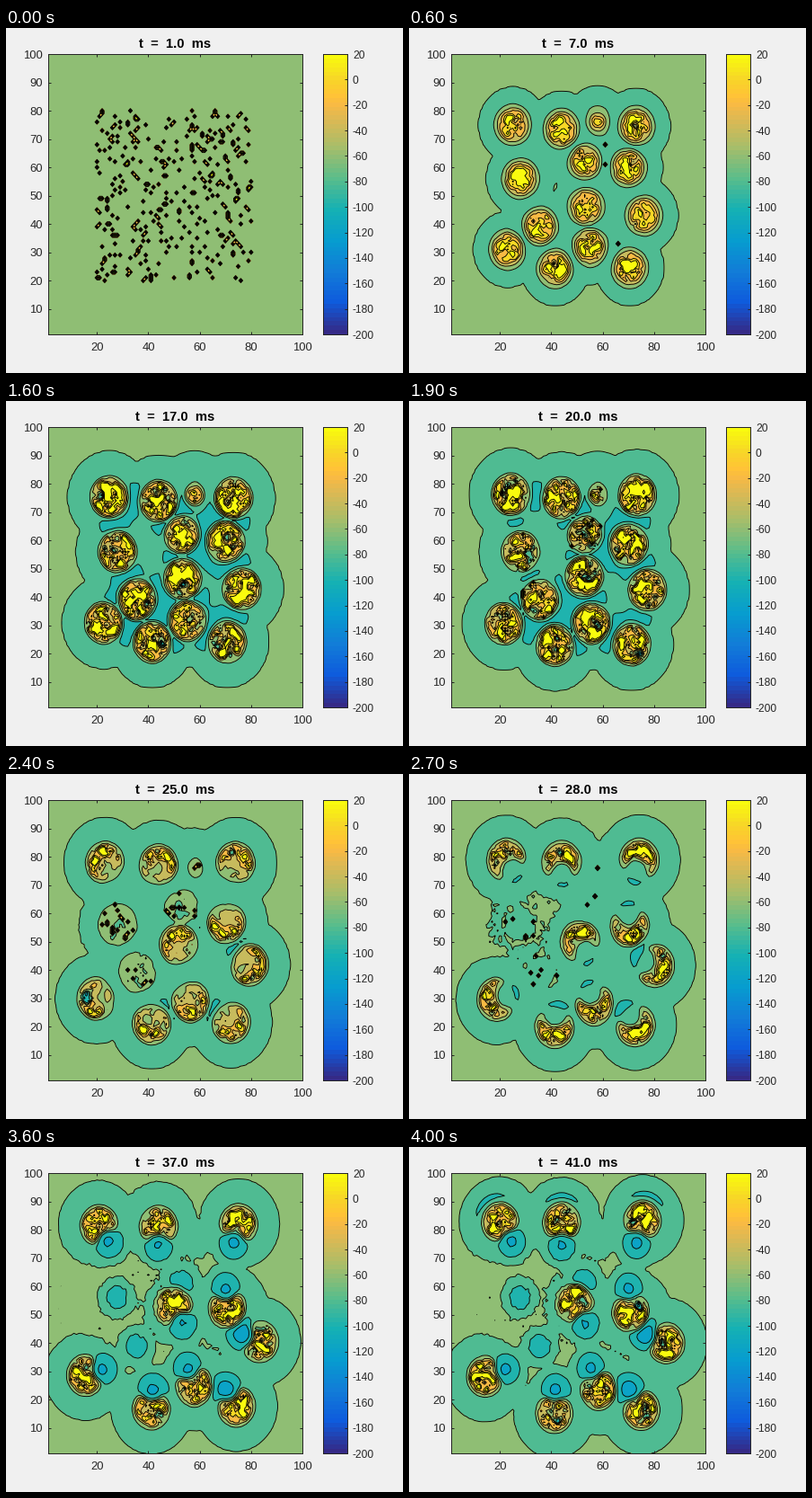
A matplotlib script for the animation above (4100 ms loop, 442 by 384 pixels).

```python
import numpy as np
import matplotlib.pyplot as plt
from matplotlib.animation import FuncAnimation
from matplotlib.colors import LinearSegmentedColormap, Normalize

W, H, DPI = 442, 384, 100
PX = 72 / DPI
FRAMES, STEP = 41, 100
INK = "#262626"
RADIUS = 6.8
TRAVEL = 9.2

plt.rcParams["font.family"] = "Liberation Sans"
plt.rcParams["axes.unicode_minus"] = False

STOPS = [(0, "#352a87"), (7, "#0f5cdd"), (14, "#127dd8"), (21, "#079dcf"),
         (28, "#15b1b4"), (35, "#59bd8c"), (42, "#a5be6b"), (49, "#e1b952"),
         (52, "#f8ba44"), (54, "#ffc337"), (58, "#f7d826"), (63, "#f9fb0e")]
CMAP = LinearSegmentedColormap.from_list(
    "volt", [(i / 63, c) for i, c in STOPS], N=64)
LEVELS = np.arange(-200, 21, 20)
FILLS = CMAP(Normalize(-200, 20)(LEVELS))

# x, y, heading in degrees
MOVERS = [(25, 75, 123), (44, 73.5, 90), (73, 74.5, 74), (70, 60, 276),
          (53.5, 46, 118), (76, 43, 341), (23, 31, 198), (41.5, 24.5, 268),
          (55, 32, 292), (70.5, 24.5, 299)]
# x, y, radius
FADERS = [(28, 56, 6.8), (35.5, 39, 6.8), (53, 62, 6.2), (58, 76, 3)]

axis = np.arange(1, 101)
X, Y = np.meshgrid(axis, axis)


def ramp(t, a, b):
    return float(np.clip((t - a) / (b - a), 0, 1))


def disc(d, r, edge):
    """Soft-edged disc, 1 inside and 0 outside."""
    return 1 / (1 + np.exp((d - r) / edge))


def smooth(n):
    """3x3 sum scaled back to unit variance."""
    rows = n + np.roll(n, 1, 0) + np.roll(n, -1, 0)
    return (rows + np.roll(rows, 1, 1) + np.roll(rows, -1, 1)) / 3


def cells(t):
    """Home, unit heading, radius, shift and strength of every bump."""
    shift = TRAVEL * ramp(t, 16, 41)
    for x, y, deg in MOVERS:
        a = np.radians(deg)
        yield x, y, np.cos(a), np.sin(a), RADIUS, shift, 1
    for x, y, r in FADERS:
        yield x, y, 0, 0, r, 0, 1 - ramp(t, 17, 30)


def field(t):
    """Membrane voltage of the sheet at t ms."""
    rng = np.random.default_rng(40 + t)
    raw = rng.standard_normal(X.shape)
    chance = rng.random(X.shape)

    size = 0.6 + 0.4 * ramp(t, 1, 12) - 0.1 * ramp(t, 20, 41)
    edge = 1.0 - 0.35 * ramp(t, 7, 13)
    pull = 34 * ramp(t, 1, 9) - 17 * ramp(t, 20, 28)
    reach = 11 + 5.6 * ramp(t, 1, 13)
    cut = ramp(t, 21, 30)
    tired = 28 * ramp(t, 21, 33)
    rise = ramp(t, 1, 6)

    active, core, dying, low = (np.zeros(X.shape) for _ in range(4))
    for x, y, ux, uy, r, shift, alive in cells(t):
        dx, dy = X - x - ux * shift, Y - y - uy * shift
        d = np.hypot(dx, dy) + 1e-6
        home = np.hypot(X - x, Y - y)
        share = (r / RADIUS) ** 2

        body = disc(d, r * size, edge) * (1 - cut * disc(home, 5.2, 0.6))
        active = np.maximum(active, body * alive * rise)
        core = np.maximum(core, body)
        dying = np.maximum(dying, disc(d, r, 0.4) * (alive < 1))

        # pull on the surroundings, then the tired patch left behind
        low += pull * alive * share * np.clip(1 - (d / reach) ** 2, 0, 1) ** 2
        low += tired * share * np.exp(-(home / 6) ** 4)
        low += alive * 8 * ramp(t, 33, 41) * np.exp(-(home / 2.5) ** 2)
        if y > 70:
            ahead = np.clip((dx * ux + dy * uy) / d, 0, 1)
            low += 18 * ramp(t, 34, 41) * ahead * np.exp(
                -((d - 9.5) / 1.8) ** 2)

    loose = ramp(t, 22, 34) * np.exp(
        -((X - 42) ** 2 + (Y - 55) ** 2) / 22 ** 2)
    rest = -59.9 + loose * (4 + 1.8 * raw) - low

    mean = 18 - 12 * ramp(t, 7, 20)
    jitter = 26 + 10 * ramp(t, 7, 13)
    noise = 0.7 * smooth(raw) + 0.7 * raw
    v = rest * (1 - active) + active * (mean + jitter * core ** 2 * noise)

    square = (np.abs(X - 50) <= 30) & (np.abs(Y - 50) <= 30)
    odds = 0.092 * np.exp(-(t - 1) / 1.5) * square
    odds = odds + 0.07 * dying * (1 - ramp(t, 25, 30))
    v[chance < odds] = 30
    return np.clip(v, -199, 36)


def frame_axes(x, y, w, h):
    ax = fig.add_axes([x / W, 1 - (y + h) / H, w / W, h / H])
    for side in ax.spines.values():
        side.set(color=INK, linewidth=PX, zorder=5)
    return ax


fig = plt.figure(figsize=(W / DPI, H / DPI), dpi=DPI, facecolor="#f0f0f0")

ax = frame_axes(47, 29, 283, 312)
ax.set(xlim=(1, 100), ylim=(1, 100),
       xticks=range(20, 101, 20), yticks=range(10, 101, 10))
ax.set_autoscale_on(False)
ax.set_axisbelow(False)
ax.tick_params(direction="in", top=True, right=True, length=3 * PX,
               width=PX, color=INK, labelcolor=INK, labelsize=13 * PX)
ax.tick_params(axis="x", pad=9 * PX)
ax.tick_params(axis="y", pad=6 * PX)

bar = frame_axes(353, 29, 27, 312)
bar.imshow(np.arange(64)[:, None], cmap=CMAP, origin="lower", aspect="auto",
           extent=(0, 1, -200, 20), interpolation="nearest")
bar.set(xticks=[], yticks=LEVELS)
bar.yaxis.tick_right()
bar.tick_params(direction="in", length=3 * PX, width=PX, color=INK,
                labelcolor=INK, labelsize=12 * PX, pad=6 * PX)

title = fig.text(188.5 / W, 1 - 22 / H, "", ha="center", va="baseline",
                 fontsize=14.8 * PX, fontweight="bold", color="black")
drawn = []


def draw(i):
    while drawn:
        drawn.pop().remove()
    v = field(i + 1)
    drawn.append(ax.contourf(X, Y, v, levels=[*LEVELS, 400],
                             colors=FILLS, zorder=1))
    drawn.append(ax.contour(X, Y, v, levels=LEVELS, colors="black",
                            linewidths=0.9 * PX, linestyles="solid",
                            zorder=2))
    title.set_text(f"t  =  {i + 1:.1f}  ms")
    return [title]


anim = FuncAnimation(fig, draw, frames=FRAMES, interval=STEP,
                     repeat=True, repeat_delay=0, blit=False)
plt.show()
```
